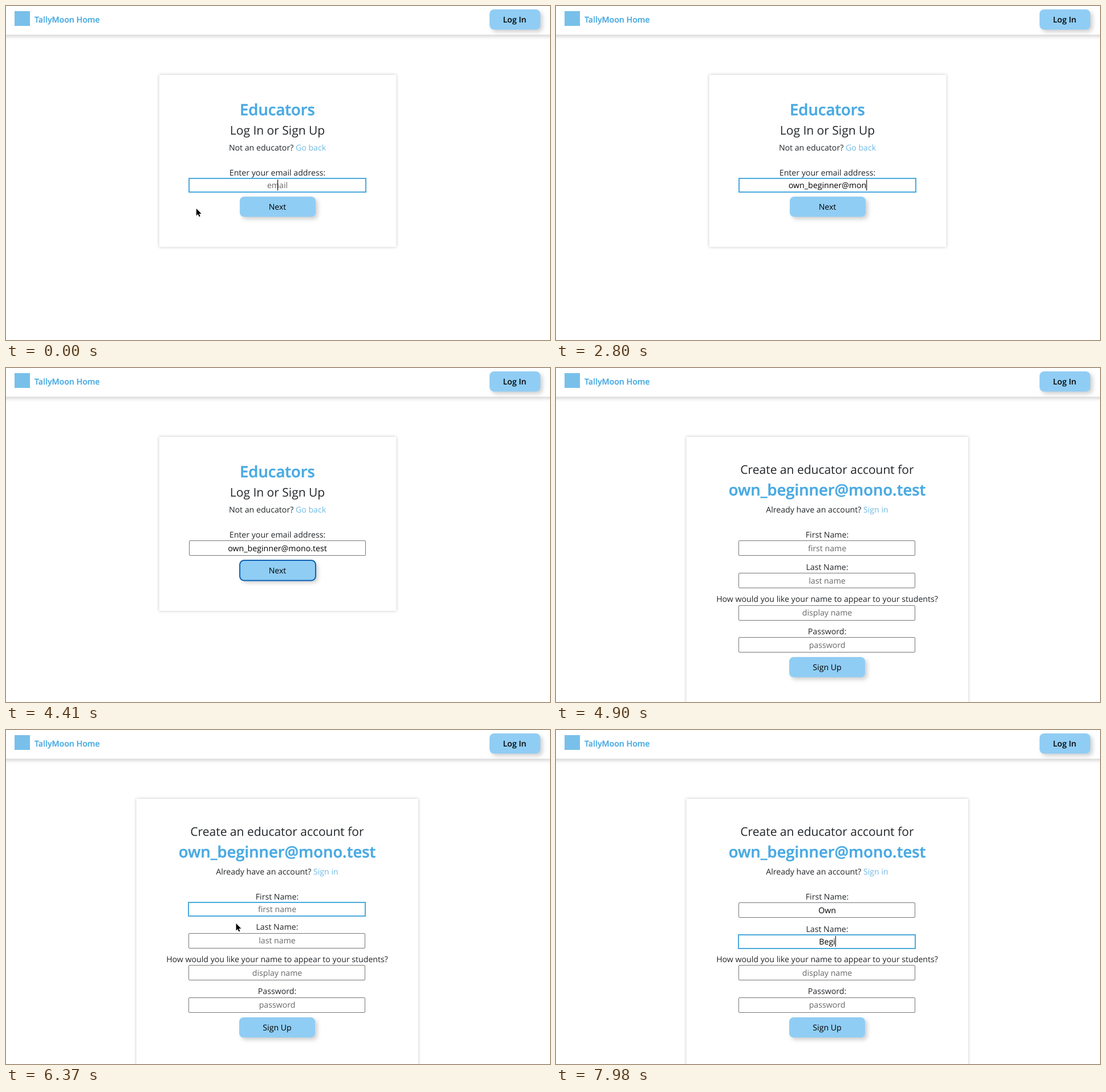
These frames come from a looping animation (954x587 px, 8 s). An HTML page:

```html
<!DOCTYPE html>
<html lang="en">
<head>
<meta charset="utf-8">
<title>Educator sign-up</title>
<style>
  html, body { margin: 0; width: 100%; height: 100%; overflow: hidden; background: #fff; }
  svg { display: block; width: 954px; height: 587px; }
  text {
    font: 400 14.15px "Open Sans", "Noto Sans", sans-serif;
    fill: #212529; text-anchor: middle; text-rendering: geometricPrecision; white-space: pre;
  }
  .brand { font-weight: 600; fill: #4aaae2; stroke: #4aaae2; stroke-width: .25px; text-anchor: start; }
  .title { font-size: 27.4px; font-weight: 600; fill: #4aaae2; stroke: #4aaae2; stroke-width: .5px; }
  .sub { font-size: 21px; }
  .link { fill: #70b9e4; }
  .hint { fill: #686868; }
  .ink { fill: #000; }
  .strong { font-weight: 600; }
  .bar { fill: #fff; filter: drop-shadow(0 3px 3px rgba(0, 0, 0, .18)); }
  .card { fill: #fff; filter: drop-shadow(0 0 2.5px rgba(0, 0, 0, .24)); }
  .btn { fill: #90cdf4; filter: drop-shadow(4px 4px 3.5px rgba(0, 0, 0, .19)); }
  .ring { fill: none; stroke: #0f62b5; stroke-width: 2; }
  .box { fill: #fff; stroke: #767676; }
  .hover { stroke: #333; }
  .focus { stroke: #4aa9dc; stroke-width: 2; }
</style>
</head>
<body>
<svg viewBox="0 0 954 587">
  <rect class="bar" x="-10" y="-20" width="974" height="70.5"/>
  <rect x="15" y="9" width="27" height="26" fill="#78c0ea"/>
  <text class="brand" x="50" y="29">TallyMoon Home</text>
  <rect class="btn" x="848" y="6" width="89" height="35.5" rx="8"/>
  <text class="ink strong" x="892" y="29">Log In</text>
  <g id="page"></g>
</svg>
<script>
const LOOP = 8000, STEP = 70;
const EMAIL = "own_beginner@mono.test";
const emailKeys = [280, 560, 630, 910, 1120, 1260, 1470, 1540, 1610, 1750, 1820, 1890,
  2380, 2660, 2730, 2800, 2940, 3080, 3220, 3360, 3570, 3640];
const firstKeys = [6720, 6790, 6860];
const lastKeys = [7490, 7700, 7840, 7980];
const T = { submit: 3990, form: 4480, wake: 5110, rest: 5600, click: 5880, leave: 6230, blink: 6370, tab: 7140 };

const page = document.getElementById("page");

const typed = (word, keys, t) => word.slice(0, keys.filter(k => k <= t).length);
const progress = (t, a, b) => {
  const k = Math.min(1, Math.max(0, (t - a) / (b - a)));
  return k * k * (3 - 2 * k);
};
const mix = (a, b, k) => a + (b - a) * k;
const rect = (cls, x, y, w, h, rx = 0, more = "") =>
  `<rect class="${cls}" x="${x}" y="${y}" width="${w}" height="${h}" rx="${rx}" ${more}/>`;
const text = (cls, x, y, str) => `<text class="${cls}" x="${x}" y="${y}">${str}</text>`;
const link = str => `<tspan class="link">${str}</tspan>`;

// One input; y is its resting top edge. Borders snap to whole pixels, text does not.
function field(cx, y, { value = "", hint, focus, hover, caret }) {
  const mid = Math.floor(cx);
  const box = focus
    ? rect("box focus", mid - 155, Math.round(y - 1.5) + 1, 310, 24)
    : rect("box" + (hover ? " hover" : ""), mid - 154.5, Math.round(y) + .5, 309, 26, 1.5);
  const base = y + (focus ? 16.5 : 18.5);
  const id = focus ? "active " : "";
  const bar = focus && caret
    ? `<rect class="caret" data-cx="${cx}" y="${base - 14.6}" width="1.1" height="19"/>` : "";
  return box + text(id + (value ? "ink" : "hint"), cx, base, value || hint) + bar;
}

function button(cx, y, label, ring = 0) {
  const x = Math.floor(cx) - 66, top = Math.round(y);
  return rect("btn", x, top, 133, 35.5, 7.5) +
    (ring ? rect("ring", x, top, 133, 35.5, 7.5, `opacity="${ring}"`) : "") +
    text("ink", cx, y + 23, label);
}

const arrow = (x, y) =>
  `<path transform="translate(${x} ${y})" d="M0 0V12.5L2.9 9.8 4.8 14.2 6.8 13.4 4.9 9H8.8Z"
    stroke="#fff" stroke-width="1.4" paint-order="stroke" stroke-linejoin="round"/>`;
const beam = (x, y) =>
  `<path transform="translate(${x} ${y})" d="M-3-7Q0-7 0-5Q0-7 3-7M0-5V5M-3 7Q0 7 0 5Q0 7 3 7M-1.5 1.5H1.5"
    fill="none" stroke="#111" stroke-width="1.1"/>`;

function loginPage(t) {
  const cx = 476, focus = t < T.submit;
  const top = focus ? 335 : 338.4;
  return rect("card", 268.5, 121, 416, top - 121 + 88.5) +
    text("title", cx, 192, "Educators") +
    text("sub", cx, 225.5, "Log In or Sign Up") +
    text("", cx, 253.5, "Not an educator? " + link("Go back")) +
    text("", cx, 298, "Enter your email address:") +
    field(cx, 303.4, { value: typed(EMAIL, emailKeys, t), hint: "email", focus, caret: true }) +
    button(cx, top, "Next", progress(t, T.submit - STEP, T.submit + 2 * STEP)) +
    (t < emailKeys[0] ? arrow(333.8, 356) : "");
}

// Pointer enters the first field, clicks, then moves off to the lower left.
function pointer(t) {
  if (t < T.wake || t >= firstKeys[0]) return null;
  const k = progress(t, T.wake - STEP, T.rest), m = progress(t, T.click, T.leave);
  return { x: mix(mix(333.5, 425, k), 403.5, m), y: mix(mix(355.5, 317, k), 340, m) };
}

function formPage(t) {
  const cx = 475.5, p = pointer(t), inside = p && p.y < 328;
  const active = t < T.click ? -1 : t < T.tab ? 0 : 1;
  const rows = [
    ["First Name:", "first name", typed("Own", firstKeys, t)],
    ["Last Name:", "last name", typed("Begi", lastKeys, t)],
    ["How would you like your name to appear to your students?", "display name"],
    ["Password:", "password"]
  ];
  let out = rect("card", 228.5, 121, 494.5, 480) +
    text("sub", cx, 185.5, "Create an educator account for") +
    text("title", cx, 224, EMAIL) +
    text("", cx, 253.5, "Already have an account? " + link("Sign in"));
  let y = 303.4;
  rows.forEach(([label, hint, value], i) => {
    const focus = i === active;
    out += text("", cx, y - 5.4, label) + field(cx, y, {
      value, hint, focus,
      hover: i === 0 && inside,
      caret: t < T.blink || t >= firstKeys[0]
    });
    y += focus ? 53.1 : 56.6;
  });
  out += button(cx, y - 21.4, "Sign Up");
  if (p) out += inside ? beam(p.x, p.y) : arrow(p.x, p.y);
  return out;
}

function draw(t) {
  page.innerHTML = t < T.form ? loginPage(t) : formPage(t);
  const caret = page.querySelector(".caret");
  if (!caret) return;
  const word = page.querySelector(".active");
  const half = word.classList.contains("ink") ? word.getComputedTextLength() / 2 : 0;
  caret.setAttribute("x", +caret.dataset.cx + half);
}

let start, shown = -1;
function tick(now) {
  start ??= now;
  const t = Math.floor((now - start) % LOOP / STEP) * STEP;
  if (t !== shown) draw(shown = t);
  requestAnimationFrame(tick);
}
draw(0);
requestAnimationFrame(tick);
</script>
</body>
</html>
```
